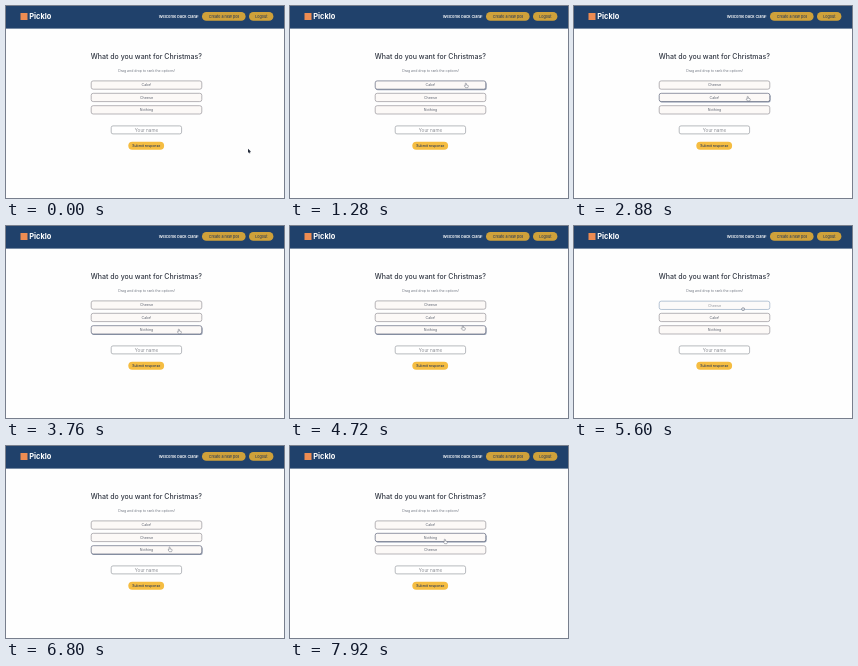
Animation, 278 px wide and 192 px high, one loop 8000 ms. Source, as an HTML page:

```html
<!DOCTYPE html>
<html lang="en">
<head>
<meta charset="utf-8">
<title>Ranking poll</title>
<style>
html, body { margin: 0; width: 100%; height: 100%; overflow: hidden; background: #fefefe; }
svg { display: block; width: 100vw; height: 100vh; }
text { font: 500 3.7px Inter, "Open Sans", sans-serif; fill: #2c3d58; text-anchor: middle; }
.brand { font-size: 7.4px; font-weight: 700; fill: #fff; text-anchor: start; }
.welcome { font-size: 3.9px; font-weight: 600; fill: #fff; text-anchor: end; }
.title { font-size: 7px; fill: #303642; }
.hint { font-size: 3.5px; font-weight: 400; fill: #737984; }
.input { font-size: 4.6px; font-weight: 400; fill: #8b8e94; }
.nav { fill: #cfa13a; }
.card .box { fill: #fcf9f7; stroke: #98959b; stroke-width: .7; }
.card .shadow { fill: #2c4268; opacity: .5; }
.card text { font-size: 3.6px; fill: #777c86; }
.card.active .box { stroke: #656b80; }
.card.dragged .box { stroke: #6684aa; }
</style>
</head>
<body>
<svg viewBox="0 0 278 192">
  <rect width="278" height="192" fill="#fefefe"/>
  <rect width="278" height="22.6" fill="#20416b"/>
  <rect x="14.5" y="7" width="7" height="7" fill="#ee8c52"/>
  <text class="brand" x="23.3" y="13.4">Picklo</text>
  <text class="welcome" x="192.5" y="12.1">Welcome back Clara!</text>
  <rect class="nav" x="196" y="6.1" width="43.6" height="8.7" rx="4.35"/>
  <text x="218" y="12">Create a new poll</text>
  <rect class="nav" x="243" y="6.1" width="24.4" height="8.7" rx="4.35"/>
  <text x="255.3" y="12">Logout</text>
  <text class="title" x="140.4" y="53.4">What do you want for Christmas?</text>
  <text class="hint" x="140.5" y="65.5">Drag and drop to rank the options!</text>
  <g id="cards"></g>
  <rect x="105.2" y="119.9" width="70.4" height="8" rx="1.8" fill="#fff" stroke="#999ca2" stroke-width=".7"/>
  <text class="input" x="140.5" y="125.6">Your name</text>
  <rect x="122.3" y="135.8" width="35.8" height="8" rx="4" fill="#f5bd42"/>
  <text x="140.3" y="141.1" style="font-size:3.5px">Submit response</text>
  <g id="pointer" stroke-linejoin="round">
    <path id="arrow" d="M0 0V4.2L1 3.3L1.7 4.7L2.4 4.4L1.8 3.1H3.1Z" fill="#222938"/>
    <path id="hand" d="M-.7 -1.6Q0 -2.2 .4 -1.5V0L2.1 .4Q2.6 .7 2.3 1.5L1.8 2.7H-.4L-1.7 .9Q-1.5 .2 -.7 .8Z" fill="#fff" stroke="#555b68" stroke-width=".45"/>
    <path id="fist" d="M-1.3 -.5Q-.8 -1.3 0 -.9Q.9 -1.4 1.5 -.6V.8L1.1 1.6H-.8L-1.3 .8Z" fill="#d8dbe2" stroke="#5f6675" stroke-width=".5"/>
  </g>
</svg>
<script>
const LOOP = 8000, TOP = 74.9, STEP = 12.4, LEFT = 85.2, WIDTH = 110.6, HEIGHT = 8.3;
const [CAKE, CHEESE, NOTHING] = [0, 1, 2];
const labels = ["Cake!", "Cheese", "Nothing"];
const home = { x: 242, y: 142.7 };

// Each step takes the pointer to (x, y); a drag trades slots with another card
const steps = [
  { from: 80, to: 1040, x: 176, y: 79 },
  { from: 1400, to: 2450, x: 174, y: 91.3, drag: CAKE, swap: CHEESE, swapAt: 2180 },
  { from: 2720, to: 3700, x: 173, y: 105 },
  { from: 3840, to: 4120, x: 173, y: 101.5 },
  { from: 4800, to: 5360, x: 169, y: 82.5 },
  { from: 5540, to: 6250, x: 169, y: 98.5, drag: CHEESE, swap: CAKE, swapAt: 5750 },
  { from: 6480, to: 7100, x: 159, y: 107 },
  { from: 7200, to: 7650, x: 155, y: 95, drag: NOTHING, swap: CHEESE, swapAt: 7400 }
];

const byId = id => document.getElementById(id);
const show = (el, on) => { el.style.display = on ? "" : "none"; };

function ease(t, from, to) {
  const p = Math.min(1, Math.max(0, (t - from) / (to - from)));
  return p * p * (3 - 2 * p);
}

function stateAt(t) {
  let { x, y } = home, held = -1;
  const slots = [0, 1, 2], alpha = [1, 1, 1];
  for (const s of steps) {
    const p = ease(t, s.from, s.to);
    x += (s.x - x) * p;
    y += (s.y - y) * p;
    if (s.drag === undefined) continue;
    const gap = slots[s.swap] - slots[s.drag];
    slots[s.drag] += gap * p;
    slots[s.swap] -= gap * ease(t, s.swapAt, s.swapAt + 200);
    alpha[s.drag] -= .64 * (ease(t, s.from, s.from + 120) - ease(t, s.to, s.to + 120));
    if (t >= s.from && t < s.to) held = s.drag;
  }
  return { x, y, held, slots, alpha };
}

byId("cards").innerHTML = labels.map(label => `<g class="card">
  <rect class="shadow" x="${LEFT + .5}" y="1" width="${WIDTH + .3}" height="${HEIGHT}" rx="2"/>
  <rect class="box" x="${LEFT}" width="${WIDTH}" height="${HEIGHT}" rx="2"/>
  <text x="140.5" y="5.4">${label}</text></g>`).join("");
const cards = [...byId("cards").children];

function draw(t) {
  const { x, y, held, slots, alpha } = stateAt(t);
  let hover = false;
  cards.forEach((card, i) => {
    const top = TOP + STEP * slots[i];
    const active = held < 0 && x > LEFT && x < LEFT + WIDTH && y > top && y < top + HEIGHT;
    hover = hover || active;
    card.setAttribute("transform", `translate(0 ${top})`);
    card.setAttribute("opacity", alpha[i]);
    card.classList.toggle("active", active);
    card.classList.toggle("dragged", held === i);
    show(card.querySelector(".shadow"), active);
  });
  byId("pointer").setAttribute("transform", `translate(${x} ${y})`);
  show(byId("arrow"), held < 0 && !hover);
  show(byId("hand"), hover);
  show(byId("fist"), held >= 0);
}

const start = performance.now();
function tick() {
  draw((performance.now() - start) % LOOP);
  requestAnimationFrame(tick);
}
tick();
</script>
</body>
</html>
```
